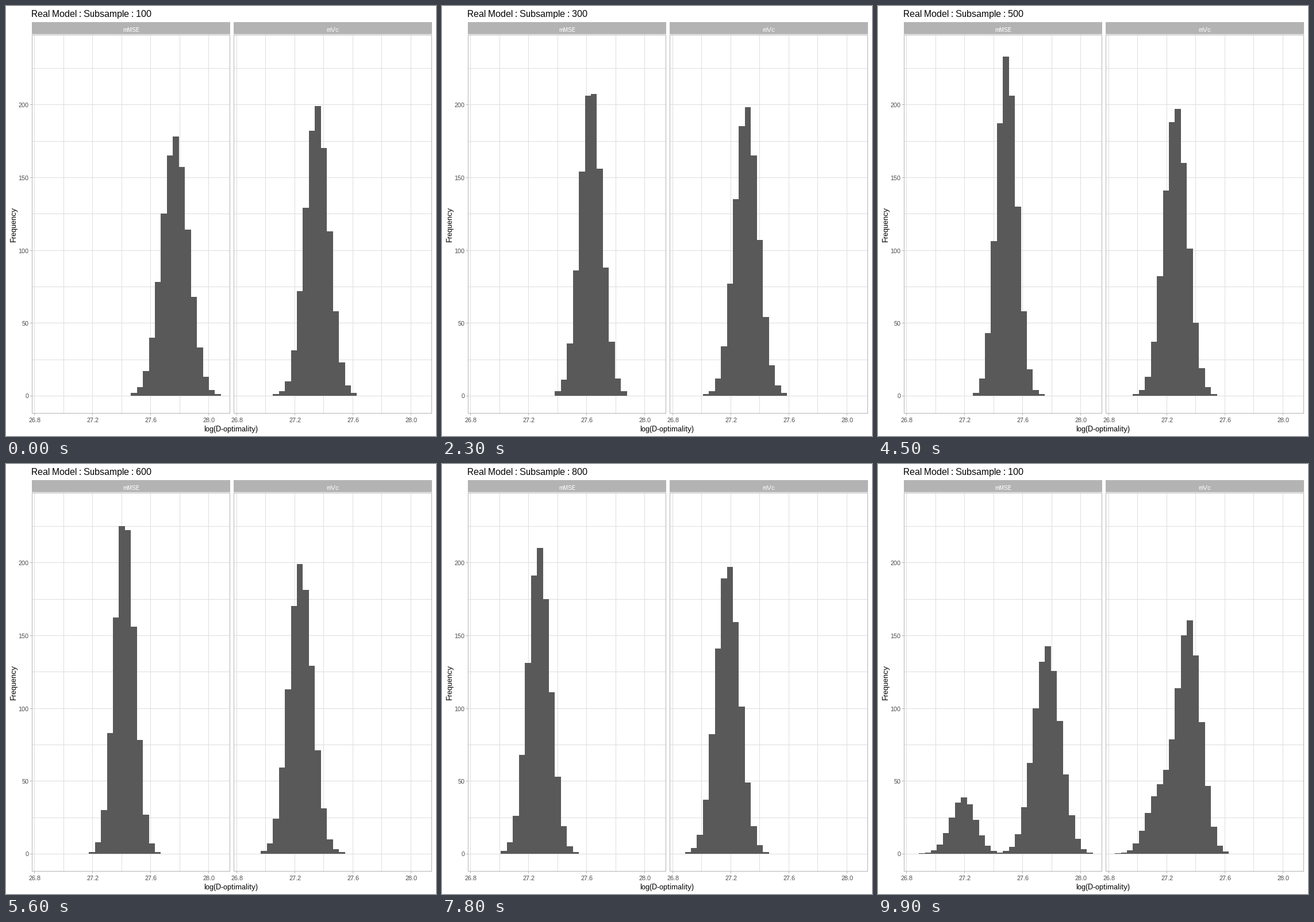
Recreate the animation shown at these times as a matplotlib script. Size 748 by 748 pixels, loop 10000 ms.

```python
import numpy as np
import matplotlib.pyplot as plt
from matplotlib.animation import FuncAnimation
from matplotlib.patches import Rectangle

SIZE, BINS, BIN_W = 748, 30, 10.44
BASE, UNIT = 678, 2.534            # y of zero, pixels per count
GREY, GRID, BAR, LABEL = "#B3B3B3", "#DEDEDE", "#595959", "#4D4D4D"

# One state per subsample size 100, 200, ... 900
STATE = np.arange(9)
STEPS = np.where(STATE < 2, 6, 5)
STARTS = 6 + 11 * STATE + np.minimum(STATE, 2)

plt.rcParams.update({"font.family": "Liberation Sans",
                     "text.hinting": "native", "text.hinting_factor": 1})
fig = plt.figure(figsize=(SIZE / 100, SIZE / 100), dpi=100, facecolor="white")
ax = fig.add_axes([0, 0, 1, 1])
ax.set(xlim=(0, SIZE), ylim=(SIZE, 0))
ax.axis("off")


def box(x0, y0, x1, y1, color):
    return ax.add_patch(Rectangle((x0, y0), x1 - x0, y1 - y0, fc=color,
                                  lw=0, antialiased=False))


def text(x, y, s, px, color="black", ha="center", **kw):
    return ax.text(x, y, s, fontsize=px * 0.72, color=color, ha=ha,
                   va="baseline", **kw)


def bells(means, spread):
    """Counts of 1000 normal draws per bin, one row per state."""
    mean = np.interp(STATE, [0, 6, 8], means)[:, None]
    sd = np.broadcast_to(spread, STATE.shape)[:, None]
    z = (np.arange(BINS) + 0.5 - mean) / sd
    return np.rint(1000 * np.exp(-z * z / 2) / (sd * np.sqrt(2 * np.pi)))


def panel(x0, name, counts):
    left, right = round(x0), round(x0 + 345)
    box(left, 28, right, 49, GREY)
    text((left + right) / 2, 44.5, name, 11, "white")
    box(left, 50, right, 709, GREY)
    box(left + 1, 51, right - 1, 708, "white")
    for n in range(0, 226, 25):
        y = round(BASE - n * UNIT)
        box(left + 1, y, right - 1, y + 1, GRID)
    for k in range(7):
        x = int(x0 + 4.9 + 50.45 * k)
        box(x, 51, x + 1, 708, GRID)
        if k % 2 == 0:
            box(x, 709, x + 1, 712, GREY)
            text(x + 0.5, 724, f"{26.8 + 0.2 * k:.1f}", 11, LABEL)
    edges = np.round(x0 + 15.68 + BIN_W * np.arange(BINS + 1))
    bars = [box(a, BASE, b, BASE, BAR) for a, b in zip(edges, edges[1:])]
    return bars, counts


panels = [
    panel(45, "mMSE", bells([22.38, 12.28, 8.42],
                            1.7 + 0.028 * (STATE - 4.4) ** 2)),
    panel(396.42, "mVc", bells([12.36, 9.08, 7.24], 2.0)),
]
for n in range(0, 201, 50):
    y = round(BASE - n * UNIT)
    box(42, y, 45, y + 1, GREY)
    text(39.5, y + 4.5, n, 11, LABEL, ha="right")
text(391, 740, "log(D-optimality)", 13)
text(17, 379.5, "Frequency", 13, rotation=90, rotation_mode="anchor")
title = text(44.5, 18.5, "", 16, ha="left")


def update(frame):
    pos = np.clip((frame - STARTS + 1) / STEPS, 0, 1).sum()
    i = int(pos)
    t, j = pos - i, (i + 1) % 9
    for bars, counts in panels:
        for bar, count in zip(bars, counts[i] * (1 - t) + counts[j] * t):
            h = round(count * UNIT)
            bar.set_y(BASE - h)
            bar.set_height(h)
            bar.set_visible(h > 0)
    title.set_text(f"Real Model : Subsample : {int(pos + 0.5) % 9 + 1}00")


anim = FuncAnimation(fig, update, frames=100, interval=100, repeat=True,
                     repeat_delay=0, init_func=lambda: update(0))
plt.show()
```
